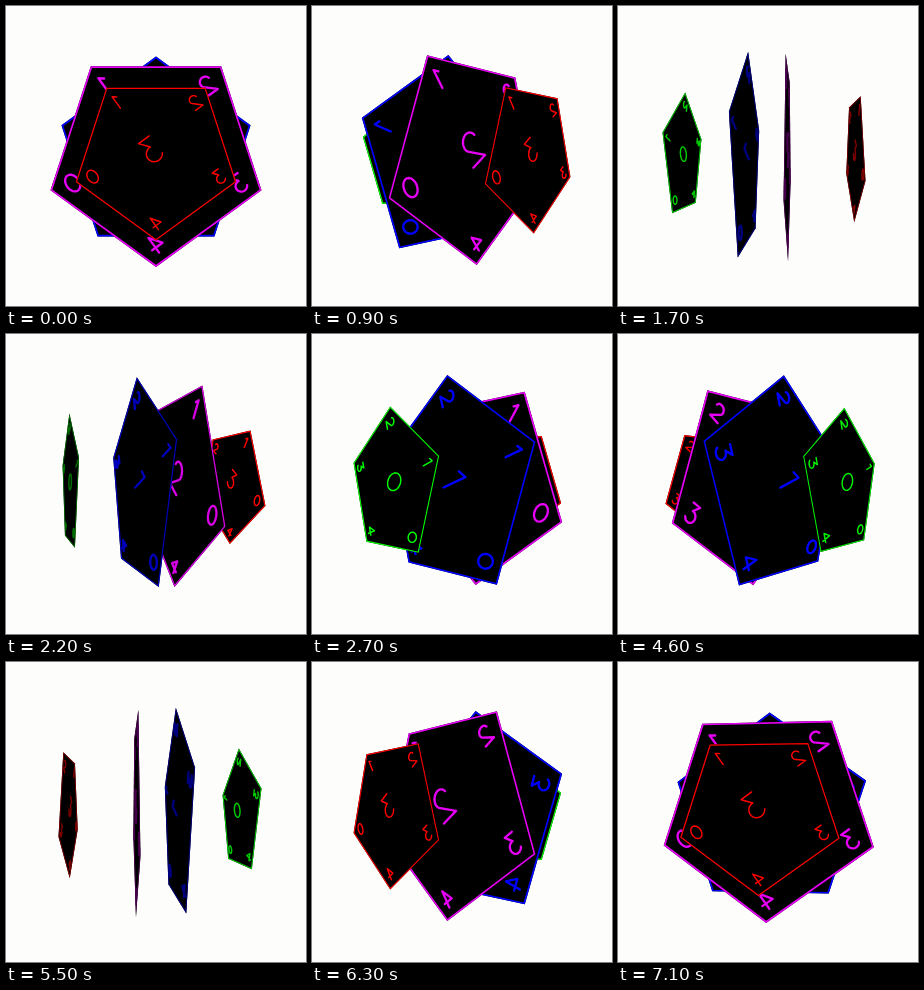
An HTML page with a canvas that plays this animation: 300 px wide and 300 px high, repeating every 7.2 s.

```html
<!DOCTYPE html>
<html lang="en">
<head>
<meta charset="utf-8">
<title>Turning pentagons</title>
<style>
html, body { margin: 0; width: 100%; height: 100%; overflow: hidden; background: #fdfefc; }
canvas { display: block; width: 300px; height: 300px; }
</style>
</head>
<body>
<canvas id="stage" width="300" height="300"></canvas>
<script>
const ctx = document.getElementById('stage').getContext('2d');
const TAU = Math.PI * 2;
const PHI = (1 + Math.sqrt(5)) / 2;
const STEP_MS = 100, STEPS = 72;
const CENTRE = 150, CAMERA = 365;
const FACE = 64.8;                      // circumradius of a dodecahedron face
const INRADIUS = FACE * PHI ** 2 / 2;

// The four vertex layers of a dodecahedron, back to front.
const plates = ['0,255,0', '0,0,255', '230,0,245', '255,0,0'].map((rgb, i) => {
  const inner = i === 1 || i === 2;
  const side = i < 2 ? -1 : 1;
  return {
    rgb: rgb.split(','),
    radius: inner ? FACE * PHI : FACE,
    z: side * INRADIUS / (inner ? PHI ** 3 : 1),
    turn: side < 0 ? TAU / 5 : TAU / 10
  };
});

// Points on an ellipse, from turn a to turn b.
function arc(cx, cy, rx, ry, a, b) {
  return Array.from({ length: 25 }, (_, i) => {
    const t = (a + (b - a) * i / 24) * TAU;
    return [cx + rx * Math.cos(t), cy + ry * Math.sin(t)];
  });
}

// Single-stroke digits of height 1, centred, y upwards.
const digits = [
  arc(0, 0, 0.36, 0.5, 0, 1),
  [[-0.2, 0.3], [0.05, 0.5], [0.05, -0.5]],
  [...arc(0, 0.21, 0.3, 0.29, 0.46, -0.1), [-0.33, -0.5], [0.33, -0.5]],
  [[-0.25, 0.5], [0.27, 0.5], [-0.03, 0.12], ...arc(0, -0.19, 0.32, 0.31, 0.25, -0.42)],
  [[0.15, -0.5], [0.15, 0.5], [-0.32, -0.17], [0.38, -0.17]]
];

const corners = digits.map((_, k) => {
  const a = (k - 1) * TAU / 5;
  return [-Math.sin(a), Math.cos(a)];
});

// Maps a point on a plate (unit radius, y upwards) to the stage.
function project({ radius, turn, z }, angle, [p, q]) {
  const u = -radius * (p * Math.cos(turn) + q * Math.sin(turn));
  const v = radius * (p * Math.sin(turn) - q * Math.cos(turn));
  const x = u * Math.cos(angle) + z * Math.sin(angle);
  const depth = z * Math.cos(angle) - u * Math.sin(angle);
  const scale = CAMERA / (CAMERA - depth);
  return [CENTRE + x * scale, CENTRE + v * scale];
}

function trace(points, plate, angle) {
  ctx.beginPath();
  for (const point of points) ctx.lineTo(...project(plate, angle, point));
}

function drawDigit(digit, plate, angle, cx, cy, size) {
  trace(digits[digit].map(([x, y]) => [cx + x * size, cy + y * size]), plate, angle);
  ctx.stroke();
}

function drawPlate(index, angle) {
  const plate = plates[index];
  // How squarely the plate faces the camera; it fades when seen edge-on.
  const facing = Math.abs(Math.cos(angle) - plate.z / CAMERA);
  const light = Math.min(1, 0.25 + 1.7 * facing);
  const pen = plate.radius / 45;

  ctx.save();
  trace(corners, plate, angle);
  ctx.closePath();
  ctx.fillStyle = '#000';
  ctx.fill();
  ctx.clip();
  ctx.strokeStyle = `rgb(${plate.rgb.map(c => Math.round(c * light))})`;
  ctx.lineWidth = 1 + pen * Math.min(1, 0.3 + facing);
  ctx.stroke();

  ctx.lineWidth = pen;
  drawDigit(index, plate, angle, 0, 0.09, 0.3);
  corners.forEach(([x, y], k) => drawDigit(k, plate, angle, x * 0.79, y * 0.79, 0.165));
  ctx.restore();
}

function draw(time) {
  const angle = Math.floor(time / STEP_MS) % STEPS * TAU / STEPS;
  const order = Math.cos(angle) > 0 ? [0, 1, 2, 3] : [3, 2, 1, 0];
  ctx.fillStyle = '#fdfefc';
  ctx.fillRect(0, 0, 300, 300);
  ctx.lineJoin = ctx.lineCap = 'round';
  for (const index of order) drawPlate(index, angle);
}

const start = performance.now();
function tick() {
  draw(performance.now() - start);
  requestAnimationFrame(tick);
}
tick();
</script>
</body>
</html>
```
